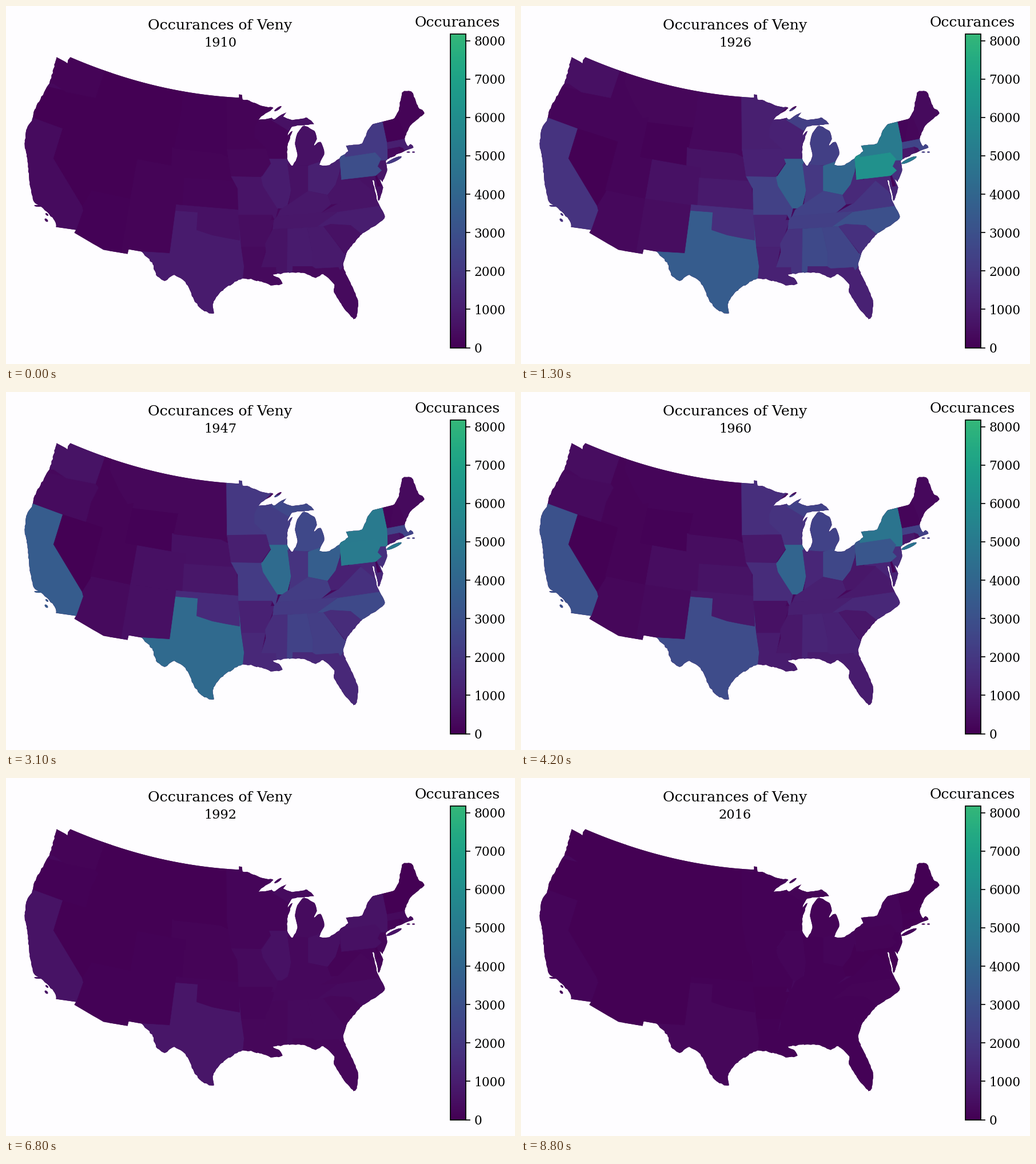
Animation, 890 px wide and 626 px high, one loop 8.9 s. Source, as a matplotlib script:

```python
import numpy as np
import matplotlib.pyplot as plt
from matplotlib.animation import FuncAnimation
from matplotlib.collections import PolyCollection
from matplotlib.colors import Normalize
from matplotlib.patches import PathPatch, Rectangle
from matplotlib.path import Path

W, H, DPI = 890, 626, 100
FRAMES, STEP = 89, 100
TOP = 8180
NAME = "Veny"

plt.rcParams["font.family"] = "DejaVu Serif"
rng = np.random.default_rng(7)
norm = Normalize(0, TOP * 1.5)
cmap = plt.get_cmap("viridis")


def px(size):
    return size * 72 / DPI


def coast(*pts, bend=0.3, jag=0.7):
    """Smooth curve through a few key points, with a ragged edge."""
    p = np.array(pts, float)
    slope = bend * (np.vstack([p[1:], p[-1:]]) - np.vstack([p[:1], p[:-1]]))
    out = []
    for a, b, u, v in zip(p[:-1], p[1:], slope[:-1], slope[1:]):
        n = max(2, int(np.hypot(*(b - a)) / 3.5))
        t = np.arange(n)[:, None] / n
        curve = ((2 * t**3 - 3 * t**2 + 1) * a + (t**3 - 2 * t**2 + t) * u
                 + (3 * t**2 - 2 * t**3) * b + (t**3 - t**2) * v)
        curve[1:] += rng.uniform(-jag, jag, (n - 1, 2))
        out.extend(map(tuple, curve))
    return out + [pts[-1]]


def blob(x, y, w, h, tilt=0):
    """Small leaf-shaped island."""
    a = np.linspace(0, 2 * np.pi, 20)
    c, s = np.cos(np.radians(tilt)), np.sin(np.radians(tilt))
    u, v = w / 2 * np.cos(a), h / 2 * np.sin(a)
    return list(zip(x + c * u - s * v, y + s * u + c * v))


# Outline, clockwise from the north-west
run = np.linspace(0, 295, 60)
border = list(zip(112 + run, 89 + 0.43 * run - 0.000644 * run**2))
superior = coast((413, 163), (425, 165), (446, 174), (467, 178), (450, 190),
                 (441, 199), (464, 195), (468, 198), (490, 185), (484, 193),
                 (500, 199), (526, 195), (538, 206))
michigan = coast((538, 206), (517, 208), (499, 211), (491, 227), (500, 218),
                 (492, 243), (491, 266), (500, 279), (509, 262), (505, 238),
                 (509, 222), (521, 209), (540, 220), (543, 232), (538, 244),
                 (549, 237), (556, 256), (547, 277))
erie = coast((547, 277), (564, 278), (598, 253), (594, 244), (622, 240),
             (632, 217), (641, 206))
north_east = coast((677, 197), (686, 183), (692, 151), (704, 148), (711, 152),
                   (720, 176), (731, 187), (708, 207), (698, 226), (697, 235),
                   (703, 245), (707, 241), (712, 247), (699, 252), (667, 267),
                   (664, 274), (666, 285), (658, 307))
atlantic = coast((658, 307), (652, 302), (659, 317), (651, 340), (648, 325),
                 (643, 305), (640, 305), (645, 325), (650, 343), (662, 368),
                 (650, 380), (621, 399), (596, 429), (589, 452))
florida = coast((589, 452), (592, 463), (606, 492), (615, 517), (613, 542),
                (607, 547), (587, 523), (573, 500), (574, 487), (554, 468),
                (541, 475), (519, 466), (495, 466))
gulf = coast((495, 466), (466, 469), (477, 475), (483, 485), (465, 488),
             (443, 481), (412, 476), (374, 500), (361, 521), (363, 537),
             (346, 533), (331, 518), (312, 481), (292, 470), (278, 480),
             (262, 470), (256, 451), (237, 429), jag=1)
mexico = [(214, 425), (212, 433), (170, 426), (119, 396), (122, 391)]
pacific = coast((87, 386), (84, 374), (63, 352), (48, 341), (40, 302), (36, 260),
                (32, 240), (37, 211), (45, 200), (50, 180), (76, 132), (85, 100),
                (88, 89))
puget = [(103, 97), (107, 100), (108, 94)]
angle = [(407, 154), (412, 155)]
main = (puget + border + angle + superior + michigan + erie + north_east
        + atlantic + florida + gulf + mexico + pacific)
long_island = blob(678, 269, 29, 6, -25)
islands = [long_island, blob(475, 179, 15, 4, -35), blob(55, 349, 12, 3, 5),
           blob(71, 364, 6, 3, 40), blob(70, 374, 7, 4, 45), blob(703, 255, 6, 2),
           blob(712, 255, 5, 2)]
land = Path.make_compound_path(*[Path(p + [p[0]], closed=True)
                                 for p in [main] + islands])

# National totals in thousands, and regional trends relative to 1926
YEARS = [1910, 1915, 1921, 1926, 1935, 1947, 1954, 1960, 1966, 1974, 1992, 2016]
TOTALS = [22.8, 58, 74, 67.8, 54, 71.7, 68, 51.5, 28.8, 10.2, 8.4, 2.5]
KEYS = [1910, 1926, 1947, 1960, 1974]
PACIFIC = (0.19, 1, 1.95, 1.7, 0.39)
SUN = (0.26, 1, 1.2, 0.8, 0.24)
PLAINS = (0.2, 1, 0.9, 0.7, 0.2)
UPPER = (0.13, 1, 1.9, 1.55, 0.2)
LAKES = (0.25, 1, 1.15, 1.05, 0.18)
MIDDLE = (0.27, 1, 0.9, 0.65, 0.15)
SOUTH = (0.33, 1, 0.9, 0.45, 0.14)
COAL = (0.47, 1, 0.82, 0.53, 0.095)
EAST = (0.41, 1, 1.0, 0.94, 0.15)


def total(year):
    return np.interp(year, YEARS, TOTALS)


polys, shares = [], []


def state(count, trend, *corners):
    """Later states cover earlier ones, so shared borders are given once."""
    polys.append(corners)
    shares.append(count * np.array(trend) / total(KEYS))


# Mountains and Pacific
state(220, PLAINS, (170, 105), (310, 143), (303, 213), (200, 200))
state(150, PLAINS, (170, 108), (184, 112), (180, 135), (197, 172), (212, 196),
      (222, 194), (211, 247), (130, 230), (150, 160))
state(180, PACIFIC, (30, 131), (156, 160), (161, 167), (148, 192), (139, 227), (30, 190))
state(500, SUN, (60, 80), (112, 80), (172, 113), (156, 160), (105, 150), (83, 135),
      (60, 133))
state(250, SUN, (130, 318), (217, 336), (200, 436), (115, 400), (122, 391))
state(30, PLAINS, (98, 214), (139, 227), (169, 237), (147, 325), (132, 349), (80, 266))
state(1800, PACIFIC, (30, 189), (98, 214), (82, 266), (132, 349), (134, 357),
      (122, 391), (87, 395), (20, 330))
state(150, PLAINS, (169, 237), (211, 247), (208, 263), (229, 268), (217, 336), (147, 321))
state(80, PLAINS, (221, 203), (303, 213), (289, 279), (208, 263))
state(400, SUN, (217, 336), (297, 347), (286, 436), (214, 428), (213, 437), (200, 436))
# Plains
state(600, PLAINS, (290, 247), (387, 258), (402, 306), (311, 300), (289, 279))
state(550, PLAINS, (229, 268), (314, 283), (308, 349), (217, 336))
state(250, PLAINS, (310, 143), (388, 155), (386, 205), (304, 197))
state(250, PLAINS, (304, 197), (386, 205), (387, 263), (375, 257), (293, 248))
state(850, PLAINS, (311, 300), (402, 306), (406, 356), (308, 349))
state(3500, SUN, (296, 357), (408, 365), (411, 421), (416, 455), (413, 482),
      (370, 560), (320, 540), (220, 440), (236, 429), (286, 432))
state(1600, SOUTH, (297, 347), (406, 356), (408, 409), (385, 405), (360, 400),
      (333, 391), (335, 360), (296, 357))
# Mississippi valley and lakes
state(1050, UPPER, (385, 150), (475, 165), (441, 199), (434, 220), (455, 249), (386, 250))
state(2350, MIDDLE, (393, 297), (448, 297), (475, 353), (470, 374), (465, 365),
      (406, 365), (405, 319))
state(1150, PLAINS, (386, 250), (455, 249), (463, 272), (445, 298), (393, 297))
state(1250, SOUTH, (406, 365), (465, 365), (462, 374), (469, 374), (453, 421), (411, 421))
state(1150, SUN, (411, 421), (453, 421), (446, 456), (472, 456), (490, 478),
      (490, 495), (413, 486), (416, 455))
state(1150, UPPER, (441, 197), (460, 188), (467, 199), (493, 217), (506, 214),
      (494, 267), (460, 267), (455, 249), (434, 229), (434, 213))
state(3700, LAKES, (460, 267), (493, 267), (498, 322), (490, 354), (474, 353),
      (461, 333), (449, 314), (446, 300), (463, 275))
state(2300, LAKES, (464, 199), (468, 181), (545, 165), (545, 207), (505, 214), (493, 217))
state(2300, LAKES, (498, 279), (548, 277), (565, 250), (550, 220), (521, 207), (501, 228))
state(2000, MIDDLE, (492, 276), (528, 279), (528, 323), (494, 349), (498, 322))
state(4000, MIDDLE, (528, 279), (555, 270), (585, 262), (583, 290), (576, 312),
      (562, 330), (528, 323))
# South
state(2400, SOUTH, (474, 367), (479, 356), (500, 342), (528, 323), (562, 330),
      (568, 346), (548, 363))
state(1900, SOUTH, (546, 364), (580, 345), (618, 300), (655, 325), (660, 350))
state(2300, SOUTH, (468, 374), (474, 367), (579, 359), (545, 386), (466, 390))
state(1800, SOUTH, (466, 390), (492, 389), (491, 474), (473, 474), (472, 456),
      (446, 456), (454, 430), (453, 415))
state(2700, SOUTH, (492, 389), (526, 387), (536, 432), (536, 455), (501, 455),
      (501, 472), (491, 472))
state(1150, SUN, (501, 455), (536, 455), (584, 457), (600, 453), (640, 530),
      (600, 565), (500, 474))
state(2500, SOUTH, (526, 387), (555, 385), (590, 432), (600, 436), (590, 453),
      (584, 461), (581, 456), (541, 458), (536, 455), (536, 432))
state(3000, SOUTH, (579, 360), (655, 349), (680, 352), (668, 385), (621, 404),
      (602, 383), (545, 385))
state(1700, SOUTH, (555, 385), (567, 381), (602, 383), (623, 400), (595, 436))
# North-east
state(1300, EAST, (600, 301), (645, 295), (665, 312), (655, 345), (642, 323),
      (619, 304), (600, 309))
state(150, EAST, (645, 295), (650, 291), (660, 313), (649, 315))
state(1400, COAL, (568, 346), (562, 330), (576, 312), (583, 290), (586, 303),
      (620, 304), (588, 337), (580, 345))
state(1700, EAST, (645, 260), (668, 268), (670, 290), (656, 314), (648, 295))
state(5000, EAST, (585, 240), (615, 225), (641, 198), (658, 200), (666, 238),
      (667, 266), (664, 269), (640, 270), (585, 270))
state(6150, COAL, (583, 264), (591, 258), (592, 264), (645, 256), (655, 267),
      (649, 280), (656, 287), (646, 296), (586, 303))
state(300, EAST, (677, 190), (688, 140), (720, 140), (738, 185), (697, 232), (684, 196))
state(200, EAST, (677, 188), (684, 194), (699, 230), (670, 237))
state(180, EAST, (658, 200), (677, 195), (670, 237), (666, 238))
state(2500, EAST, (666, 238), (697, 232), (725, 232), (725, 262), (698, 257),
      (689, 246), (667, 250))
state(800, EAST, (667, 250), (687, 246), (691, 262), (667, 269))
state(500, EAST, (687, 246), (693, 248), (698, 255), (690, 261))
state(5000, EAST, *long_island)
shares = np.array(shares)

fig = plt.figure(figsize=(W / DPI, H / DPI), dpi=DPI, facecolor="#fefdff")
ax = fig.add_axes([0, 0, 1, 1])
ax.axis("off")


def label(x, y, text, size, ha="center"):
    return ax.text(x, y, text, size=px(size), ha=ha, va="baseline")


bar = np.linspace(0, TOP, 256)[:, None]
ax.imshow(bar, cmap=cmap, norm=norm, extent=(776, 803, 597, 48), origin="lower",
          aspect="auto", zorder=1)
ax.add_patch(Rectangle((776, 48), 27, 549, fill=False, ec="black", lw=px(1.7), zorder=2))
for v in range(0, 9000, 1000):
    y = 597 - v * 549 / TOP
    ax.plot([803, 810], [y, y], color="black", lw=px(1.7))
    label(818, y + 8.5, str(v), 21.7, "left")
label(789, 35, "Occurances", 25)
label(374, 40, "Occurances of " + NAME, 25.3)
year_text = label(374, 70, "", 22.5)

ax.add_patch(PathPatch(land, fc=cmap(0.02), lw=0, zorder=0))
states = PolyCollection(polys, linewidths=0.5, zorder=1)
ax.add_collection(states)
states.set_clip_path(land, ax.transData)
# Whole numbers fall on pixel centres
ax.set_xlim(-0.5, W - 0.5)
ax.set_ylim(H - 0.5, -0.5)


def update(i):
    year = 1910 + round(i * 1.2)
    counts = [total(year) * np.interp(year, KEYS, s) for s in shares]
    colors = cmap(norm(np.array(counts)))
    states.set_facecolor(colors)
    states.set_edgecolor(colors)
    year_text.set_text(str(year))
    return states, year_text


anim = FuncAnimation(fig, update, frames=FRAMES, interval=STEP, repeat=True)
plt.show()
```
